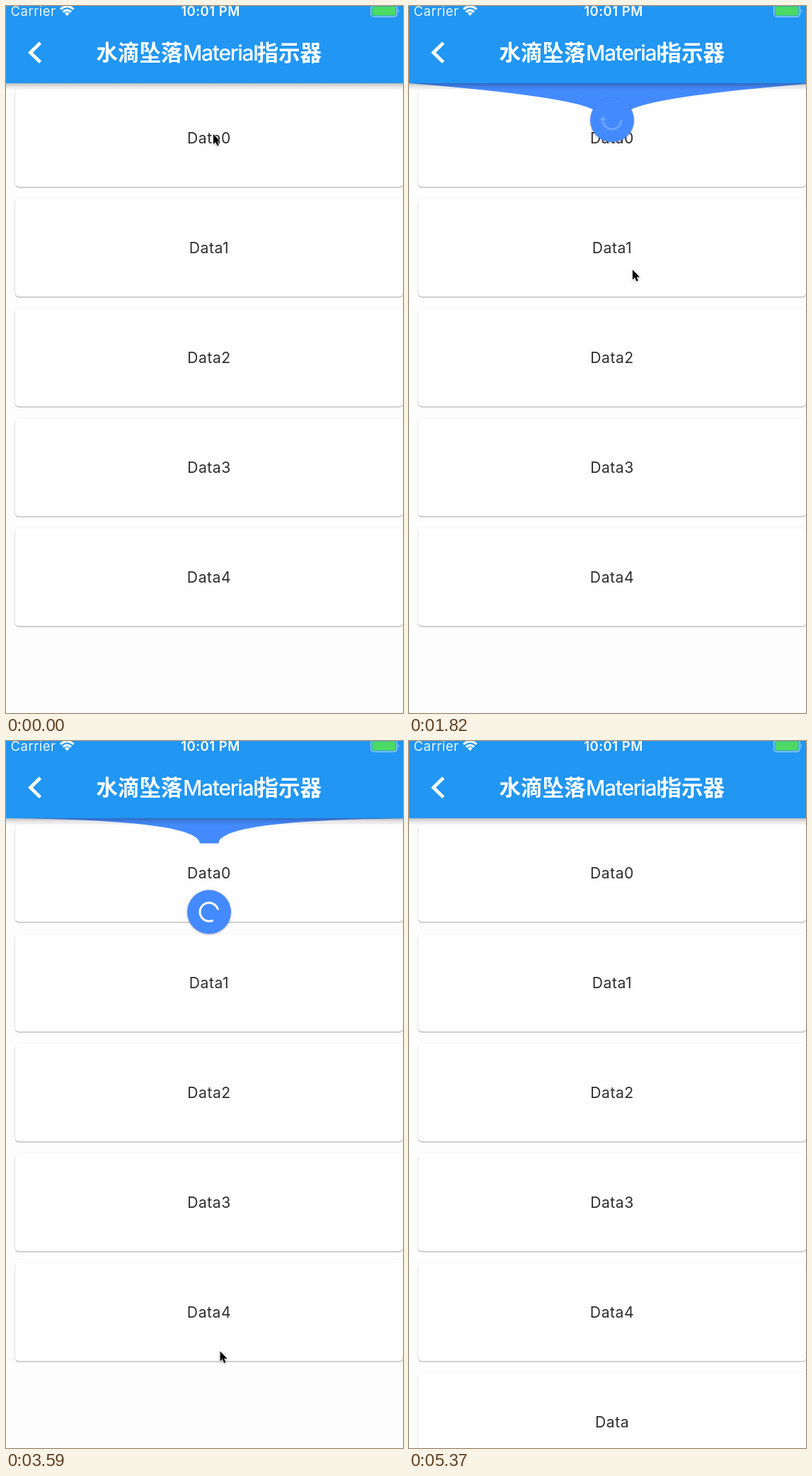
Recreate the animation shown at these times as an HTML page. Size 561 by 998 pixels, loop 6090 ms.

```html
<!DOCTYPE html>
<html lang="zh">
<head>
<meta charset="utf-8">
<title>Water drop indicator</title>
<style>
  html, body { margin: 0; width: 100%; height: 100%; overflow: hidden; background: #fdfdfd; }
  svg { display: block; width: 100%; height: 100%; }
  text { font-family: Inter, "Noto Sans CJK SC", "Noto Sans CJK", sans-serif; }
  .card rect { fill: #fefefe; filter: drop-shadow(0 1.5px .6px rgba(0,0,0,.32)) drop-shadow(0 .4px .6px rgba(0,0,0,.12)); }
  .card text { font-size: 21.2px; letter-spacing: .5px; fill: #2e2e2e; text-anchor: middle; }
  .bar text { fill: #fff; }
  .cjk { font: 700 30.5px "Noto Sans CJK SC", "Noto Sans CJK", sans-serif; }
  #ball { filter: drop-shadow(0 1.6px 1.4px rgba(0,0,0,.28)); }
  #cursor { filter: drop-shadow(0 1px 1px rgba(0,0,0,.3)); }
</style>
</head>
<body>
<svg viewBox="0 0 561 998" preserveAspectRatio="none">
  <defs>
    <linearGradient id="shade" x2="0" y2="1">
      <stop offset="0" stop-opacity=".25"/>
      <stop offset=".45" stop-opacity=".1"/>
      <stop offset="1" stop-opacity="0"/>
    </linearGradient>
  </defs>
  <rect width="561" height="998" fill="#fdfdfd"/>
  <g id="cards"></g>
  <path id="neck" fill="#448aff"/>
  <g id="drop">
    <circle id="ball" r="31" fill="#448aff"/>
    <g id="ring" fill="none" stroke="#fff" stroke-width="3">
      <path id="arc"/>
      <path id="head" d="M0-5L6 0L0 5Z" fill="#fff" stroke="none"/>
    </g>
  </g>
  <g class="bar">
    <rect y="109" width="561" height="10" fill="url(#shade)"/>
    <rect width="561" height="109" fill="#2196f3"/>
    <text x="6.5" y="14" font-size="18.5" letter-spacing=".5" opacity=".92">Carrier</text>
    <g fill="none" stroke="#fff" stroke-width="3">
      <path d="M77 4.5Q86.3-3.5 95.6 4.5M80.5 8.3Q86.3 3.5 92.1 8.3"/>
      <path d="M82.8 10.2Q86.3 7.5 89.8 10.2L86.3 14Z" fill="#fff" stroke="none"/>
    </g>
    <text x="289" y="14" font-size="18.5" font-weight="600" letter-spacing=".5" text-anchor="middle">10:01 PM</text>
    <rect x="515.7" y="-1.2" width="36.6" height="16.4" rx="4" fill="none" stroke="#a9d5f8" stroke-width="1.2"/>
    <rect x="517.5" y=".6" width="33" height="12.8" rx="2" fill="#4cd964"/>
    <path d="M554 4.5Q556.5 7 554 9.5Z" fill="#a9d5f8"/>
    <path d="M48.5 52L34.5 65.7L48.5 79.4" fill="none" stroke="#fff" stroke-width="4.8"/>
    <text class="cjk" x="127.5" y="77">水滴坠落</text>
    <text x="250" y="76.5" font-size="30" font-weight="500" letter-spacing="-1.3">Material</text>
    <text class="cjk" x="354.5" y="77">指示器</text>
  </g>
  <path id="cursor" d="M0 0V14L3.2 11L5.5 16.3L7.9 15.3L5.7 10.2H10Z" stroke="#fff" stroke-width="1.2" paint-order="stroke"/>
</svg>
<script>
const LOOP = 6090, TOP = 109, MID = 287, R = 31;
const RELEASE = 3450, FALL = 400, REST = 223, DONE = 4740, SHRINK = 300;
const $ = id => document.getElementById(id);
const set = (id, name, value) => $(id).setAttribute(name, value);
const show = (id, on) => set(id, 'visibility', on ? 'visible' : 'hidden');
const clamp = v => Math.min(1, Math.max(0, v));
const mix = (a, b, k) => a + (b - a) * k;

// Rows are [key, ...values], interpolated linearly.
function track(rows, key) {
  let i = 1;
  while (i < rows.length - 1 && key > rows[i][0]) i++;
  const [a, b] = [rows[i - 1], rows[i]];
  const k = clamp((key - a[0]) / (b[0] - a[0]));
  return a.slice(1).map((v, n) => mix(v, b[n + 1], k));
}

const pointer = [
  [240, 293, 181], [380, 306, 173], [530, 306, 173], [1010, 309, 206], [1120, 310, 218],
  [1820, 316, 372], [2350, 301, 533], [3010, 303, 857], [3130, 303, 862],
  [3450, 303, 862], [3820, 302, 861], [4900, 302, 861], [5310, 333, 898]
];
const pull = [
  [530, -33], [760, 15], [1010, 39], [1120, 41], [1820, 52], [2350, 66], [3010, 83]
];
// pull, overlap with the ball, control point x and y
const neckShape = [
  [0, 0, 160, 0], [39, 9, 190, 20.5], [52, 15, 222, 18], [66, 22, 245, 10], [83, 28, 273, 4]
];
// time, start, sweep, opacity
const arrow = [
  [1100, -70, 0, 0], [1820, 0, 178, .22], [2350, 40, 258, .32], [3010, 27, 265, .45]
];

$('cards').innerHTML = ['Data0', 'Data1', 'Data2', 'Data3', 'Data4', 'Data'].map((label, i) =>
  `<g class="card" id="card${i}" transform="translate(0 ${i * 155})">
    <rect x="12.5" y="116.5" width="549" height="139" rx="6"/>
    <text x="287" y="193.5">${label}</text></g>`).join('');

// Cubic (0.4, 0, 0.2, 1) solved for x by bisection.
function fastOutSlowIn(x) {
  let lo = 0, hi = 1;
  for (let i = 0; i < 20; i++) {
    const s = (lo + hi) / 2, r = 1 - s;
    if (1.2 * r * r * s + .6 * r * s * s + s * s * s < x) lo = s; else hi = s;
  }
  return lo * lo * (3 - 2 * lo);
}

function polar(deg, r = 13) {
  const a = deg * Math.PI / 180;
  return [r * Math.cos(a), r * Math.sin(a)];
}

function drawArc(start, sweep) {
  const a = polar(start), b = polar(start + sweep);
  set('arc', 'd', `M${a}A13 13 0 ${sweep > 180 ? 1 : 0} 1 ${b}`);
}

function drawNeck(d, stretch) {
  const [overlap, cx, cy] = track(neckShape, d);
  const half = Math.sqrt(R * R - overlap * overlap);
  const y = TOP + Math.max(0, d - overlap) * stretch;
  const c = TOP + cy * stretch;
  set('neck', 'd', `M0 ${TOP}Q${cx} ${c} ${MID - half} ${y}H${MID + half}` +
    `Q${2 * MID - cx} ${c} ${2 * MID} ${TOP}Z`);
}

function drawSpinner(t) {
  const turn = (t - 3070) / 1000;
  const step = Math.floor(turn), k = turn - step;
  const head = fastOutSlowIn(clamp(k * 2));
  const tail = fastOutSlowIn(clamp(k * 2 - 1));
  drawArc(-90 + 270 * tail + 306 * k - 144 * step, Math.max(.5, 270 * (head - tail)));
  set('arc', 'stroke-linecap', 'square');
  set('ring', 'opacity', 1);
}

function drawArrow(t) {
  const [start, sweep, alpha] = track(arrow, t);
  const end = start + sweep;
  drawArc(start, sweep);
  set('arc', 'stroke-linecap', 'butt');
  set('head', 'transform', `translate(${polar(end)}) rotate(${end + 90})`);
  set('ring', 'opacity', alpha);
}

function render(t) {
  const d = track(pull, t)[0];
  const fall = clamp((t - RELEASE) / FALL);
  const size = 1 - clamp((t - DONE) / SHRINK);
  const active = t >= 530 && size > 0;
  const released = t >= RELEASE;

  show('drop', active);
  show('neck', active && fall < 1);
  drawNeck(d, 1 - fall);
  set('drop', 'transform', `translate(${MID} ${TOP + mix(d, REST, fall)}) scale(${size})`);
  set('head', 'display', released ? 'none' : 'inline');
  released ? drawSpinner(t) : drawArrow(t);

  show('card5', t >= DONE);
  show('cursor', t < 5370);
  set('cursor', 'transform', `translate(${track(pointer, t)})`);
}

const begin = performance.now();
function tick() {
  render((performance.now() - begin) % LOOP);
  requestAnimationFrame(tick);
}
render(0);
requestAnimationFrame(tick);
</script>
</body>
</html>
```
